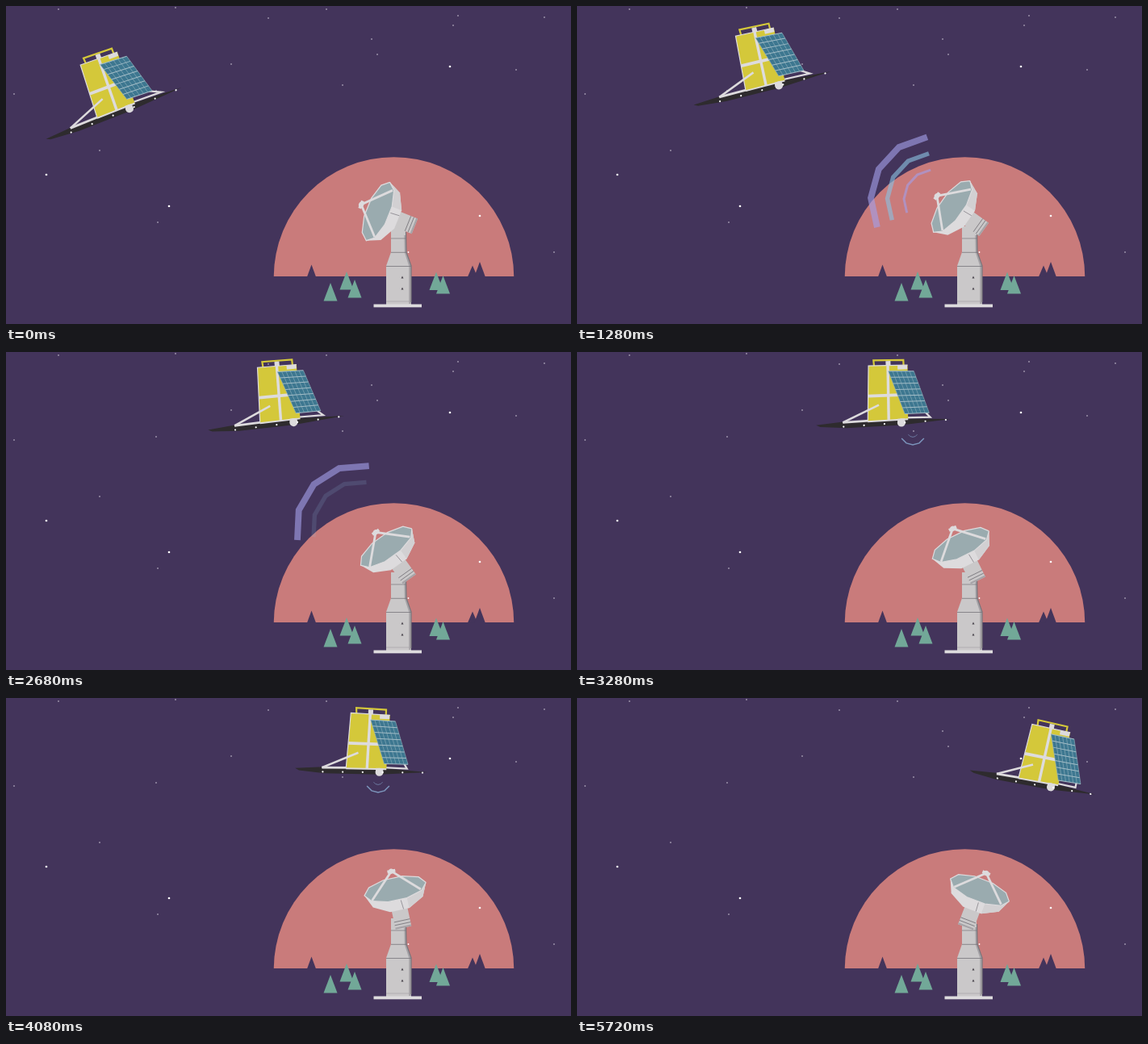
Animation, 700 px wide and 394 px high, one loop 5.76 s. Source, as an HTML page with a canvas:

```html
<!DOCTYPE html>
<html lang="en">
<head>
<meta charset="utf-8">
<title>Satellite pass</title>
<style>
  html, body { margin: 0; width: 100%; height: 100%; overflow: hidden; background: #43345b; }
  canvas { display: block; width: 700px; height: 394px; }
</style>
</head>
<body>
<canvas id="stage" width="700" height="394"></canvas>
<script>
const LOOP = 5760, STEP = 40, LAST = 5720;
const ctx = document.getElementById('stage').getContext('2d');

const SKY = '#43345b', DOME = '#c97b7b', TREE = '#72a898';
const LIGHT = '#dddbdd', GREY = '#cac8c9', SHADE = '#a5a2a6', DARK = '#77747a';
const YELLOW = '#d4c83a', BLACK = '#2e2b2e';

const rad = deg => deg * Math.PI / 180;
const mix = (a, b, k) => a + (b - a) * k;
const mixPt = (a, b, k) => a.map((v, i) => mix(v, b[i], k));
const clamp = v => Math.max(0, Math.min(1, v));
const fade = (t, from, to) => clamp((t - from) / 160) * clamp((to - t) / 160);

// Corners of an angular arc, n sides from one angle to another
const ring = (rx, ry, n, from, to) => Array.from({ length: n + 1 }, (_, i) => {
  const a = rad(mix(from, to, i / n));
  return [rx * Math.cos(a), ry * Math.sin(a)];
});

function trace(pts) {
  ctx.beginPath();
  pts.forEach(([x, y]) => ctx.lineTo(x, y));
}
function poly(color, pts) {
  trace(pts);
  ctx.closePath();
  ctx.fillStyle = color;
  ctx.fill();
}
function line(color, width, ...pts) {
  trace(pts);
  ctx.strokeStyle = color;
  ctx.lineWidth = width;
  ctx.stroke();
}
function dot(color, x, y, r) {
  ctx.beginPath();
  ctx.arc(x, y, r, 0, Math.PI * 2);
  ctx.fillStyle = color;
  ctx.fill();
}
function rect(color, x, y, w, h) {
  ctx.fillStyle = color;
  ctx.fillRect(x, y, w, h);
}
const level = (color, width, x1, x2, y) => line(color, width, [x1, y], [x2, y]);
const peak = (color, x, y, w, h) => poly(color, [[x, y], [x + w / 2, y + h], [x - w / 2, y + h]]);

function place(x, y, deg, draw) {
  ctx.save();
  ctx.translate(x, y);
  ctx.rotate(rad(deg));
  draw();
  ctx.restore();
}

const smallStars = [[65, 4], [210, 2], [325, 15], [397, 4], [453, 41], [460, 60], [554, 24],
  [560, 12], [667, 14], [632, 79], [417, 98], [279, 72], [186, 105], [10, 109],
  [116, 179], [188, 268], [679, 305]];
const bigStars = [[550, 75], [50, 209], [202, 248], [587, 260]];

function scenery() {
  rect(SKY, 0, 0, 700, 394);
  dot(DOME, 480.5, 336, 148.8);
  rect(SKY, 330, 335, 302, 152);
  peak(SKY, 378.5, 320.5, 11, 15);
  peak(SKY, 578, 321.5, 12, 14);
  peak(SKY, 587, 317, 14, 19);
  for (const [x, y] of [[402, 343], [422, 329], [432, 339], [533, 329.5], [541.5, 334]])
    peak(TREE, x, y, 17, 22.5);
  for (const [x, y] of smallStars) dot('#d5d0dd', x, y, 0.8);
  for (const [x, y] of bigStars) dot('#ffffff', x, y, 1.35);
}

function pillar() {
  rect(GREY, 477, 273, 18, 33);
  poly(GREY, [[477, 305], [496, 305], [502, 322], [502, 370], [471, 370], [471, 322]]);
  line(SHADE, 2.5, [494.5, 284], [495, 305], [500.5, 322], [500.5, 369]);
  line(DARK, 1.2, [495.5, 280], [496, 305], [502, 322], [502, 367]);
  level(DARK, 0.7, 477, 495, 288);
  level(DARK, 0.8, 477, 496, 305.3);
  level(DARK, 0.8, 471, 502, 322.5);
  level(SHADE, 0.7, 471, 501, 366);
  peak('#4b464e', 491, 334.5, 3, 3);
  peak('#4b464e', 491, 348.5, 3, 3);
  rect(LIGHT, 455.5, 369.5, 59.5, 3.8);
  dot('#ffffff', 498.5, 305, 0.9);
}

// The dish swings on the neck, slowly at first
function dish(t) {
  const s = t / 1000;
  place(488.4, 265.6, -68 + 9 * s + 1.147 * s * s, () => {
    ctx.translate(0, -29.6);
    rect(GREY, -10, 22, 20, 27);
    rect(SHADE, -10, 47, 20, 2);
    level(DARK, 0.8, -10, 10, 40);
    level(DARK, 0.8, -10, 10, 44);
    poly(LIGHT, ring(39, 28, 5, 0, 180));
    poly('#d2d0d2', ring(39, 28, 5, 0, 180).slice(0, 3).concat([[12, 14]]));
    line('#8d8a90', 0.8, [4, 15], [5, 26.5]);
    const face = ring(39, 14.5, 10, 0, 360);
    poly('#9aabaf', face);
    line(LIGHT, 1.2, ...face);
    line(LIGHT, 2.8, [31, 7], [0, -22.5], [-31, 8]);
    dot(LIGHT, 0, -22.5, 3.2);
    rect(LIGHT, -5, -24.5, 10, 4);
  });
}

function groundWaves(t) {
  place(523, 212, (t - 1280) * 0.0107, () => {
    ctx.translate(-81, 28);
    for (let i = 0; i < 3; i++) {
      const from = 600 + 120 * i;
      ctx.globalAlpha = 0.62 * fade(t, from, from + 2000);
      line(i === 1 ? '#8cc0e0' : '#a49fe8', 3 + 2.4 * i, ...ring(37 + 20.5 * i, 37 + 20.5 * i, 4, 154, 264));
    }
  });
}

function spaceWaves(t) {
  const k = (t - 3280) / 800;
  for (let i = 0; i < 2; i++) {
    const r = 6.4 + 9.6 * i, from = 2840 + 120 * i;
    place(mix(416, 461, k), mix(99, 101, k), 0, () => {
      ctx.globalAlpha = 0.85 * fade(t, from, from + 1560);
      line('#86a6cc', 0.7 + 0.8 * i, ...ring(r, r, 4, 150, 30));
    });
  }
}

function panel(k) {
  const tl = mixPt([-15, -64], [-12.5, -64.5], k), tr = mixPt([19.5, -62], [16.7, -64], k);
  const bl = mixPt([1, -12], [7.5, -10], k), br = mixPt([34, -11], [35.5, -11], k);
  poly('#3d7790', [tl, tr, br, bl]);
  const cols = 6, rows = 7;
  for (let i = 0; i <= cols; i++)
    line('#8fb0bc', 0.6, mixPt(tl, tr, i / cols), mixPt(bl, br, i / cols));
  for (let i = 0; i <= rows; i++)
    line('#a3bdc7', 1, mixPt(tl, bl, i / rows), mixPt(tr, br, i / rows));
}

function satellite(t) {
  const k = t / LAST, s = t / 1000 - 2.9;
  const height = 87 + s * s * (3.85 - 0.32 * s);
  place(mix(153, 587, k), height, mix(-20.5, 11.3, k), () => {
    const left = mix(-110, -102.4, k), right = mix(70, 55.7, k);
    poly(BLACK, [[left, -1], [-70, -4], [0, -5], [right, -2], [0, 3], [-68, 4], [left + 5, 1.5]]);

    const foot = [mix(-77, -69, k), -3], heel = [mix(44, 30, k), -5.5];
    line(LIGHT, 2.8, foot, [-36, -4]);
    line(LIGHT, 2.2, [5, -6], heel, [30, -12]);

    const tl = [-38, -72], tr = [10.5, -71], bl = [-41.5, -3], br = [8.5, -4];
    line(YELLOW, 2.2, [-31, -71], [-31.5, -78.5], [5.5, -77.5], [5.5, -70]);
    rect(LIGHT, -16.5, -77, 6, 7);
    poly(YELLOW, [tl, tr, br, bl]);
    line(LIGHT, 1.2, bl, tl, tr);
    line(LIGHT, 2, bl, br);
    rect(LIGHT, -2, -71, 12, 5);
    level(LIGHT, 3.8, -39.5, 0, -34.5);
    line(LIGHT, 3.4, [-14, -72], [-15.5, -4]);
    line(LIGHT, 2.6, foot, [-27, -23]);
    panel(k);
    dot(LIGHT, 0, 0, 5);
    rect(LIGHT, -4.5, -5, 9, 5);

    for (let i = 0; i < 6; i++)
      dot('#ffffff', mix(28 * i - 78, 23.4 * i - 67, k), 2.2 - i * 0.7, 1.1);
  });
}

function draw(t) {
  scenery();
  groundWaves(t);
  pillar();
  dish(t);
  spaceWaves(t);
  satellite(t);
}

const start = performance.now();
function tick() {
  const t = (performance.now() - start) % LOOP;
  draw(Math.floor(t / STEP) * STEP);
  requestAnimationFrame(tick);
}
tick();
</script>
</body>
</html>
```
